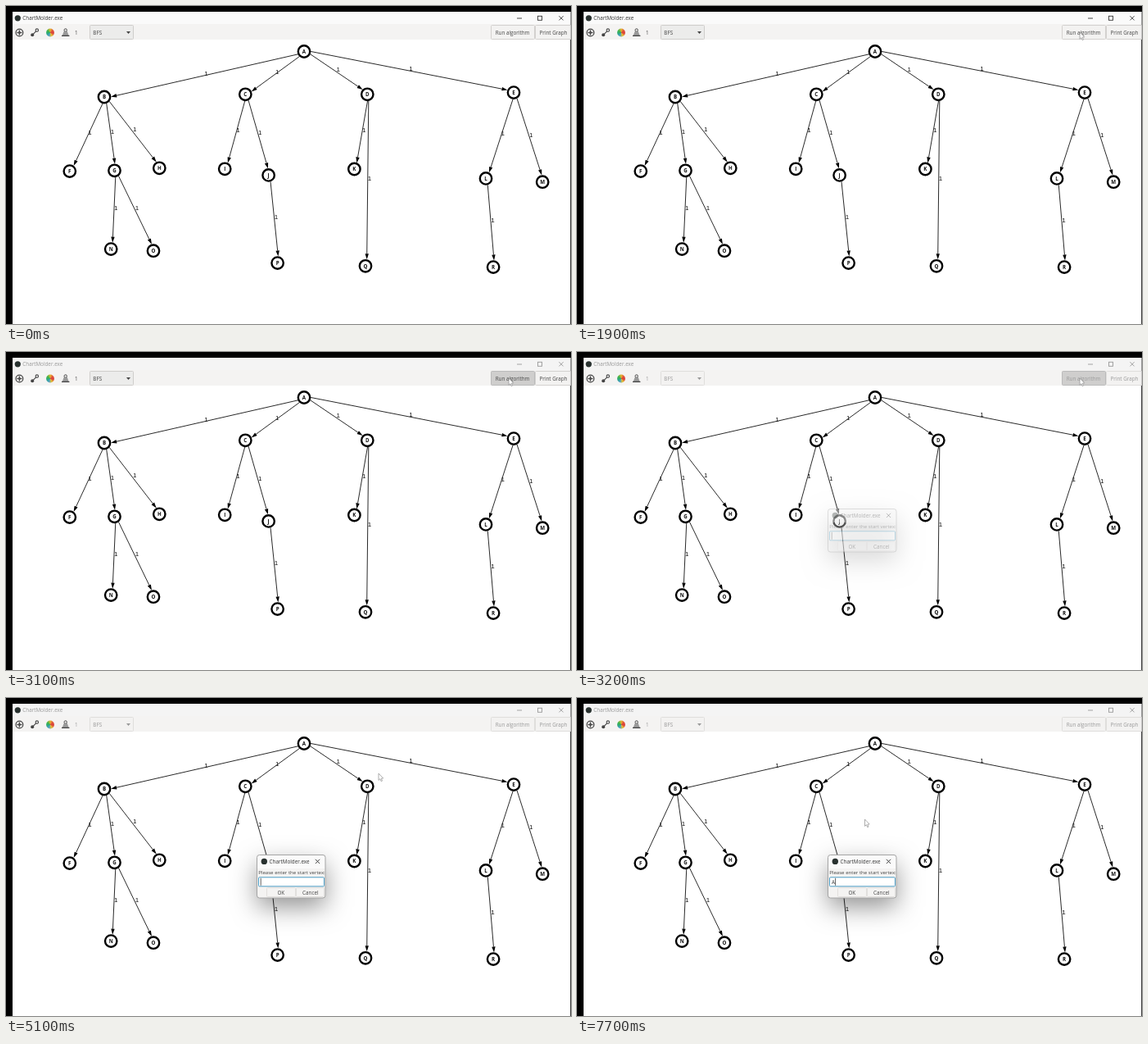
Animation of 690 by 388 pixels, one loop 8000 ms. Source, as an HTML page with a canvas:

```html
<!DOCTYPE html>
<html lang="en">
<head>
<meta charset="utf-8">
<title>Tree traversal</title>
<style>
html, body { margin: 0; width: 100%; height: 100%; overflow: hidden; background: #000; }
canvas { display: block; }
</style>
</head>
<body>
<canvas id="stage" width="690" height="388"></canvas>
<script>
const ctx = document.getElementById('stage').getContext('2d');
const LOOP = 8000, STEP = 100;
const UI = '"Open Sans", "Noto Sans", sans-serif';
const TITLE = 'ChartMolder.exe';
const WINDOW = [8, 7, 681.5, 381];

const nodes = {
  A: [364, 55.5], B: [120, 111], C: [292.3, 107.8], D: [441.3, 107.8], E: [620, 105.6],
  F: [77.8, 201.6], G: [132.5, 200.8], H: [187.3, 197.8], I: [267.2, 198.8], J: [320.6, 206.4],
  K: [425.4, 199], L: [586, 210.4], M: [655.2, 214.7], N: [128.2, 296.6], O: [180, 298.7],
  P: [331.6, 313.6], Q: [439, 317.3], R: [595.1, 318.6]
};
const edges = 'AB AC AD AE BF BG BH CI CJ DK DQ EL EM GN GO JP LR'.split(' ');

// Times at which the text caret toggles, beginning visible with the dialog.
const caretToggles = [4000, 4400, 5200, 5600, 6000, 6400, 6700, 7700];

const mix = (a, b, k) => a + (b - a) * k;
const clamp = k => Math.max(0, Math.min(1, k));

function text(str, x, y, { size = 6.3, color = '#444', align = 'center', weight = 400, family = UI } = {}) {
  ctx.font = `${weight} ${size}px ${family}`;
  ctx.fillStyle = color;
  ctx.textAlign = align;
  ctx.textBaseline = 'alphabetic';
  ctx.fillText(str, x, y);
}

function line(points, color, width = 1) {
  ctx.beginPath();
  points.forEach(p => ctx.lineTo(...p));
  ctx.strokeStyle = color;
  ctx.lineWidth = width;
  ctx.stroke();
}

function polygon(points, fill) {
  ctx.beginPath();
  points.forEach(p => ctx.lineTo(...p));
  ctx.closePath();
  ctx.fillStyle = fill;
  ctx.fill();
}

function circle(x, y, r, fill, stroke, width = 1) {
  ctx.beginPath();
  ctx.arc(x, y, r, 0, Math.PI * 2);
  if (fill) { ctx.fillStyle = fill; ctx.fill(); }
  if (stroke) { ctx.strokeStyle = stroke; ctx.lineWidth = width; ctx.stroke(); }
}

function box(x, y, w, h, fill, stroke, radius = 1) {
  ctx.beginPath();
  ctx.roundRect(x, y, w, h, radius);
  if (fill) { ctx.fillStyle = fill; ctx.fill(); }
  if (stroke) { ctx.strokeStyle = stroke; ctx.lineWidth = 1; ctx.stroke(); }
}

function cross(x, y, r, color) {
  line([[x - r, y - r], [x + r, y + r]], color, 0.9);
  line([[x + r, y - r], [x - r, y + r]], color, 0.9);
}

// Each edge runs slightly to the left of its direction of travel.
function drawEdge([from, to]) {
  const [x1, y1] = nodes[from], [x2, y2] = nodes[to];
  const length = Math.hypot(x2 - x1, y2 - y1);
  const ux = (x2 - x1) / length, uy = (y2 - y1) / length;
  const side = 1.6, gap = 8;
  const along = (distance, offset = side) =>
    [x1 + ux * distance + uy * offset, y1 + uy * distance - ux * offset];
  const tip = length - gap, back = tip - 7;
  line([along(gap), along(back)], '#111', 0.9);
  polygon([along(tip), along(back, side - 2.2), along(back, side + 2.2)], '#000');
  text('1', ...along(length / 2),
    { size: 8, align: 'left', color: '#111', family: '"Liberation Sans", Arial, sans-serif' });
}

function drawNode(name) {
  const [x, y] = nodes[name];
  circle(x, y, 7.2, '#fff', '#000', 2.4);
  text(name, x, y + 2.2, { size: 6.2, weight: 700, color: '#111' });
}

function drawTitleBar(active) {
  const color = active ? '#333' : '#999';
  ctx.fillStyle = active ? '#fafafa' : '#f4f4f4';
  ctx.fillRect(8, 7, 682, 15);
  circle(14.3, 14.8, 3.6, '#28312f');
  text(TITLE, 20.3, 17.3, { align: 'left', color });
  line([[624, 15], [630, 15]], color, 0.9);
  ctx.strokeStyle = color;
  ctx.lineWidth = 0.9;
  ctx.strokeRect(649.5, 12.3, 5, 5);
  cross(678, 14.8, 2.6, color);
}

function drawIcons() {
  const dark = '#444';
  circle(16.4, 32.5, 4.4, null, dark, 1.2);
  line([[13.4, 32.5], [19.4, 32.5]], dark, 1.5);
  line([[16.4, 29.5], [16.4, 35.5]], dark, 1.5);

  line([[32, 35.6], [38, 29.4]], dark, 1.1);
  circle(32.2, 35.3, 2, dark);
  circle(37.8, 29.6, 1.7, '#fff', dark, 1.1);

  const wheel = ctx.createConicGradient(-Math.PI / 2, 54, 32.5);
  ['#e8b632', '#e0503a', '#d8403c', '#e8c532', '#4a9fc8', '#2aa97a', '#42b548', '#e8b632']
    .forEach((c, i) => wheel.addColorStop(i / 7, c));
  circle(54, 32.5, 4.9, wheel);

  circle(72.7, 29.5, 1.7, null, dark, 1);
  polygon([[70.6, 31], [74.8, 31], [77, 37], [68.4, 37]], '#999');
  line([[68, 36.4], [77.4, 36.4]], dark, 1.4);
}

function drawToolbar(enabled, pressed) {
  const color = enabled ? '#444' : '#999';
  ctx.fillStyle = '#f4f3f2';
  ctx.fillRect(8, 22, 682, 19);
  drawIcons();
  text('1', 85.7, 34.7, { color });
  box(102.5, 23.5, 53, 17, enabled ? '#ececeb' : '#f3f2f1', enabled ? '#cfcdcb' : '#dfdedc');
  text('BFS', 106.3, 34.7, { align: 'left', color });
  polygon([[147, 31], [152, 31], [149.5, 34]], color);
  const border = enabled ? '#d3d1cf' : '#dfdedc';
  box(592.5, 23.5, 53, 17, pressed ? '#cfcecd' : '#f3f2f1', pressed ? '#bbb' : border);
  box(646.5, 23.5, 46, 17, '#f3f2f1', border);
  text('Run algorithm', 618.5, 34.7, { color });
  text('Print Graph', 668.5, 34.7, { color });
}

function drawTooltip() {
  box(582, 48, 77.5, 19.5, '#353535', null, 2);
  text('Run selected algorithm', 621, 60.4, { color: '#ddd' });
}

function drawDialog(alpha, typed, caret) {
  ctx.save();
  ctx.globalAlpha = alpha;
  ctx.shadowColor = 'rgba(0,0,0,.42)';
  ctx.shadowBlur = 30;
  ctx.shadowOffsetY = 11;
  box(307, 192, 83, 52, '#f4f3f2', null, 3);
  ctx.shadowColor = 'transparent';
  box(307, 192, 83, 16, '#fafafa', null, [3, 3, 0, 0]);
  box(306.5, 191.5, 83.5, 52.5, null, '#a5a5a5', 3);
  circle(315.3, 199.4, 3.7, '#28312f');
  text(TITLE, 321.6, 201.9, { align: 'left', color: '#333' });
  cross(380.5, 199.4, 2.6, '#333');
  text('Please enter the start vertex:', 308.2, 215.4, { align: 'left', size: 6.1 });
  box(308.5, 218.8, 80, 11, '#fff', '#4a9cc4');
  box(318.5, 231.5, 35, 11, '#f4f3f2', '#e1dfdd');
  box(354.5, 231.5, 34, 11, '#f4f3f2', '#e1dfdd');
  text('OK', 335.8, 239.5);
  text('Cancel', 371.8, 239.5);
  if (typed) text('A', 311, 226.8, { align: 'left' });
  if (caret) {
    const x = typed ? 315.6 : 311.2;
    line([[x, 219.8], [x, 228.8]], '#333', 0.8);
  }
  ctx.restore();
}

function cursorAt(t) {
  if (t < 1300) return null;
  if (t < 5100) {
    const k = clamp((t - 1300) / 600), eased = k * k * (3 - 2 * k);
    return [mix(432, 614, eased), mix(5, 32, eased)];
  }
  const k = 1 - (1 - clamp((t - 5100) / 300)) ** 2;
  return [mix(455, 351.5, k), mix(92, 148, k)];
}

function drawCursor([x, y]) {
  const outline = [[0, 0], [0, 8.4], [1.9, 6.7], [3.2, 9.7], [4.5, 9.1], [3.3, 6.2], [5.7, 6], [0, 0]]
    .map(([dx, dy]) => [x + dx, y + dy]);
  polygon(outline, '#fff');
  line(outline, '#999', 0.8);
}

function draw(t) {
  ctx.fillStyle = '#000';
  ctx.fillRect(0, 0, 690, 388);
  ctx.save();
  ctx.beginPath();
  ctx.rect(...WINDOW);
  ctx.clip();
  ctx.fillStyle = '#fff';
  ctx.fillRect(...WINDOW);
  drawTitleBar(t < 3000);
  drawToolbar(t < 3200, t >= 2900 && t < 3300);
  edges.forEach(drawEdge);
  Object.keys(nodes).forEach(drawNode);
  if (t >= 2400 && t < 2900) drawTooltip();
  if (t >= 3200) {
    const caret = caretToggles.filter(at => at <= t).length % 2 === 0;
    drawDialog(clamp((t - 3100) / 300), t >= 7700, caret);
  }
  const cursor = cursorAt(t);
  if (cursor) drawCursor(cursor);
  ctx.restore();
}

const start = performance.now();
function frame() {
  const t = (performance.now() - start) % LOOP;
  draw(Math.floor(t / STEP) * STEP);
  requestAnimationFrame(frame);
}
frame();
</script>
</body>
</html>
```
